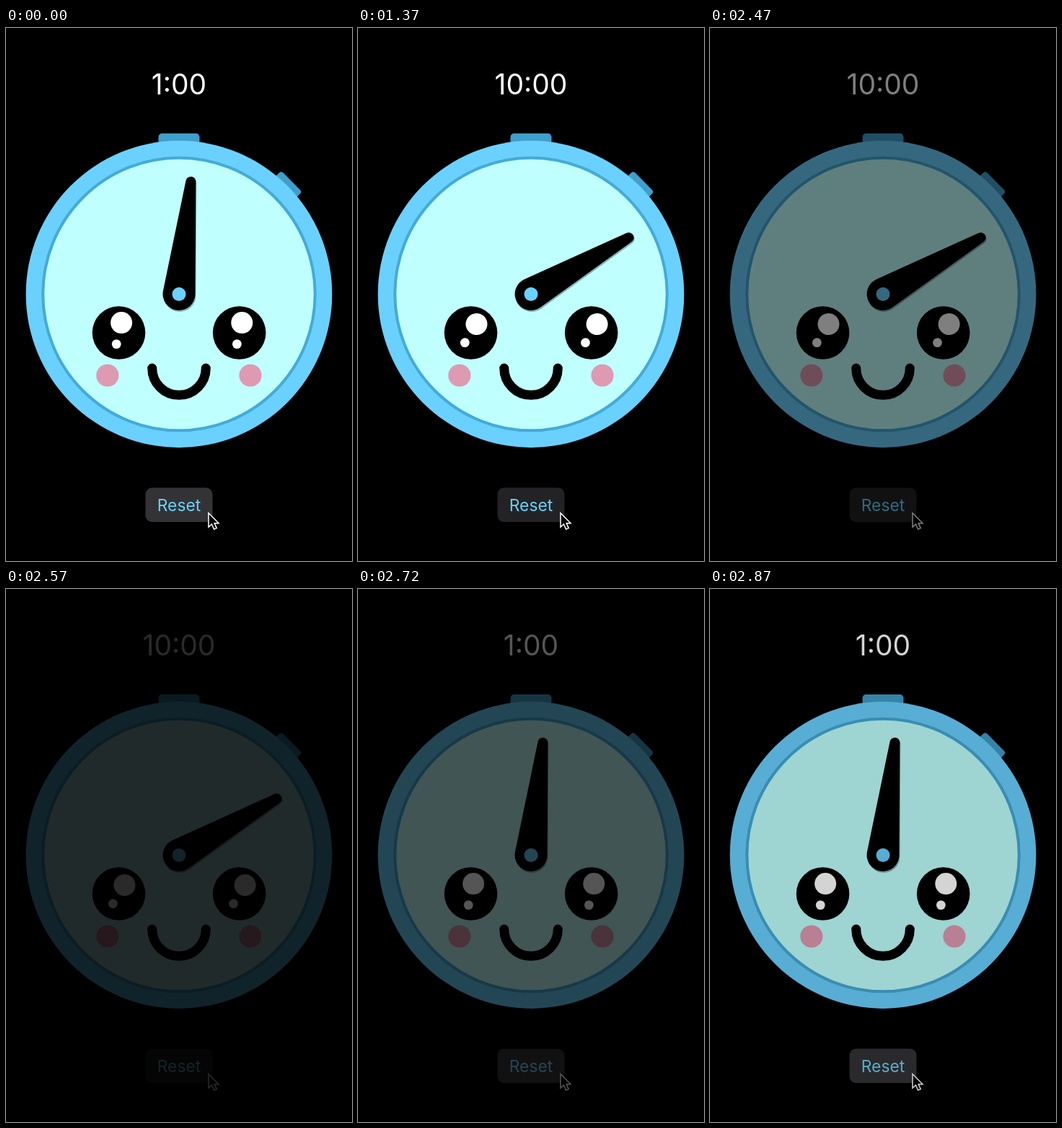
Recreate the animation shown at these times as an HTML page. Size 480x738 px, loop 2920 ms.

```html
<!DOCTYPE html>
<html lang="en">
<head>
<meta charset="utf-8">
<title>Stopwatch</title>
<style>
  @property --swing { syntax: "<number>"; inherits: true; initial-value: 0; }

  html, body { margin: 0; width: 100%; height: 100%; overflow: hidden; background: #000; }

  svg {
    display: block;
    width: 100%;
    height: 100%;
    animation: swing 2.92s step-end infinite, fade 2.92s infinite;
  }

  text { font-family: Inter, Roboto, sans-serif; text-anchor: middle; }
  .time { font-size: 39px; fill: #fff; }
  .label { font-size: 22.8px; fill: #6ad1fa; }
  .short { animation: show-short 2.92s step-end infinite; }
  .long { animation: show-long 2.92s step-end infinite; }

  .rim { fill: #6ad1ff; }
  .knob { fill: #409fca; }
  .face { fill: #bffffd; stroke: #45aad6; stroke-width: 4; }
  .cheek { fill: #de9ab0; }
  .smile { fill: none; stroke: #000; stroke-width: 13; stroke-linecap: round; }
  .shaded { filter: drop-shadow(1px 2.2px .5px rgb(0 0 0 / .3)); }
  .hand { transform: rotate(calc(6deg + 54deg * var(--swing))); }
  .shine { fill: #fff; transform: rotate(calc(19deg * var(--swing))); }
  .button { fill: hsl(240 2% calc(20.5% - 6.3% * var(--swing))); }
  .cursor { fill: #000; stroke: #fff; stroke-width: 1.5; }

  /* An ease-in-out turn, held at 30 pictures per second */
  @keyframes swing {
    0% { --swing: 0; }
    34.24% { --swing: .0024; }
    35.61% { --swing: .0336; }
    36.64% { --swing: .104; }
    37.67% { --swing: .215; }
    39.04% { --swing: .358; }
    40.06% { --swing: .52; }
    41.09% { --swing: .678; }
    42.46% { --swing: .815; }
    43.49% { --swing: .916; }
    44.52% { --swing: .977; }
    45.89% { --swing: .9997; }
    46.91% { --swing: 1; }
    89.72%, 100% { --swing: 0; }
  }

  @keyframes fade {
    0% { opacity: 1; animation-timing-function: step-end; }
    81.16% { opacity: .8333; animation-timing-function: steps(5); }
    89.72% { opacity: 0; animation-timing-function: steps(6); }
    100% { opacity: 1; }
  }

  @keyframes show-short {
    0%, 89.72%, 100% { opacity: 1; }
    34.24% { opacity: 0; }
  }

  @keyframes show-long {
    0%, 89.72%, 100% { opacity: 0; }
    34.24% { opacity: 1; }
  }
</style>
</head>
<body>
<svg viewBox="0 0 480 738">
  <defs>
    <g id="eye">
      <circle r="36.8"/>
      <g class="shine">
        <circle cx="3.6" cy="-13.9" r="15"/>
        <circle cx="-3.3" cy="15.6" r="6.4"/>
      </g>
    </g>
  </defs>

  <text class="time short" x="240" y="92">1:00</text>
  <text class="time long" x="240" y="92">10:00</text>

  <g transform="translate(240 368.5)">
    <rect class="knob" x="-28.5" y="-222.5" width="57" height="30" rx="5"/>
    <rect class="knob" x="-20.5" y="-221" width="41" height="30" rx="4" transform="rotate(45)"/>
    <circle class="rim" r="212.4"/>
    <circle class="face" r="188.8"/>
  </g>

  <use href="#eye" x="156.5" y="422"/>
  <use href="#eye" x="323.7" y="422"/>
  <circle class="cheek" cx="140.8" cy="481" r="15.6"/>
  <circle class="cheek" cx="339" cy="481" r="15.6"/>
  <path class="smile" d="M202.7 471A37.3 37.3 0 0 0 277.3 471"/>

  <g transform="translate(240 368.5)">
    <g class="shaded">
      <path class="hand" d="M-22.4-2.2L-7-156.7A7 7 0 0 1 7-156.7L22.4-2.2A22.5 22.5 0 1 1-22.4-2.2Z"/>
    </g>
    <circle class="rim" r="9.5"/>
  </g>

  <rect class="button" x="193.5" y="636.5" width="93" height="47.5" rx="9"/>
  <text class="label" x="240" y="669">Reset</text>
  <path class="cursor" d="M281 671.5V691L285.4 687L288.6 694L292.2 692.4L289.2 685.8H295Z"/>
</svg>
</body>
</html>
```
